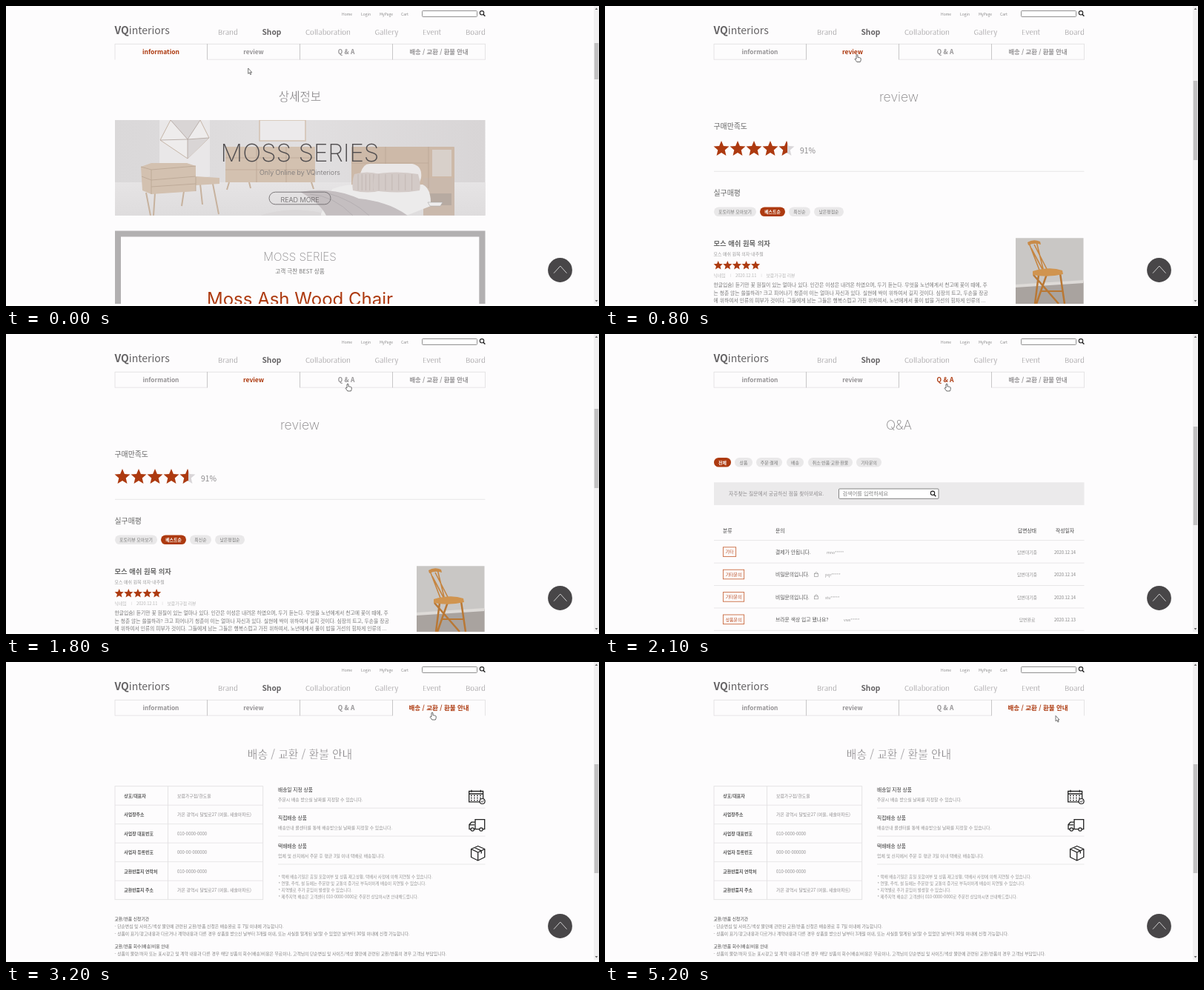
An HTML page that plays this animation: 800 px wide and 405 px high, repeating every 5.3 s.

```html
<!DOCTYPE html>
<html lang="ko">
<head>
<meta charset="utf-8">
<title>Shop detail tabs</title>
<style>
html,body{margin:0;width:100%;height:100%;overflow:hidden;background:#fdfcfd}
svg{display:block;font-family:"Noto Sans CJK KR","Noto Sans KR","Noto Sans CJK JP","Noto Sans CJK",sans-serif}
.geo{font-family:Inter,"Noto Sans CJK KR",sans-serif}
text{white-space:pre}
</style>
</head>
<body>
<svg id="stage" width="800" height="405" viewBox="0 0 800 405"></svg>
<script>
const RED = '#ad3a10', LINE = '#e2e1e2', PAGE = '#fdfcfd', WOOD = '#d3c1b0', GRAIN = '#b9a594';
const LOOP = 5300, STEP = 100;

const text = (x, y, s, size, fill = '#808080', extra = '') =>
  `<text x="${x}" y="${y}" font-size="${size}" fill="${fill}" ${extra}>${s.replace(/&/g, '&amp;')}</text>`;
const centered = (x, y, s, size, fill, extra = '') => text(x, y, s, size, fill, `text-anchor="middle" ${extra}`);
const rect = (x, y, w, h, fill, extra = '') =>
  `<rect x="${x}" y="${y}" width="${w}" height="${h}" fill="${fill}" ${extra}/>`;
const path = (d, fill = 'none', stroke = 'none', width = 1, extra = '') =>
  `<path d="${d}" fill="${fill}" stroke="${stroke}" stroke-width="${width}" ${extra}/>`;
const rule = (y, x1 = 147, x2 = 646.5) => path(`M${x1} ${y}H${x2}`, 'none', LINE, .8);
const geo = w => `class="geo" font-weight="${w}"`;
const bold = 'font-weight="700"', medium = 'font-weight="500"';
// A page-coloured outline thins the regular weight where no light one is installed.
const light = `font-weight="300" stroke="${PAGE}" stroke-width=".3"`;

const star = (x, y, r, fill, extra = '') => {
  const points = Array.from({length: 10}, (_, i) => {
    const a = i * Math.PI / 5, d = i % 2 ? r * .45 : r;
    return `${(x + d * Math.sin(a)).toFixed(2)},${(y - d * Math.cos(a)).toFixed(2)}`;
  });
  return `<polygon points="${points.join(' ')}" fill="${fill}" ${extra}/>`;
};
const magnifier = (x, y) =>
  `<circle cx="${x}" cy="${y}" r="2.7" fill="none" stroke="#222" stroke-width="1.1"/>` +
  path(`M${x + 1.9} ${y + 1.9}l2.5 2.5`, 'none', '#222', 1.4);
const pill = (x1, x2, y, label, on) =>
  rect(x1, y, x2 - x1, 12.6, on ? RED : '#e9e8e9', 'rx="6.3"') +
  centered((x1 + x2) / 2, y + 8.5, label, 5.9, on ? '#fff' : '#777', on ? bold : medium);

const TABS = ['information', 'review', 'Q & A', '배송 / 교환 / 환불 안내'];
function tabBar(active) {
  let s = path('M147 51.3H646.5M147 51V72.5M646.5 51V72.5', 'none', LINE, .9);
  TABS.forEach((label, i) => {
    const x = 147 + i * 125, on = i === active;
    if (i) s += path(`M${x - .5} 51V72.5`, 'none', '#c2c1c2', .9);
    if (!on) s += rule(72.2, x, x + 124.6);
    s += centered(x + 62, 65.2, label, on ? 8.5 : 8.3, on ? RED : '#949294', bold);
  });
  return s;
}

function header() {
  const menu = [[286, 'Brand'], [345.5, 'Shop'], [404, 'Collaboration'], [497.5, 'Gallery'], [562, 'Event'], [620, 'Board']];
  return text(146.5, 38, '<tspan font-weight="700">VQ</tspan>interiors', 14, '#656365') +
    [[453, 'Home'], [479, 'Login'], [504, 'MyPage'], [533, 'Cart']].map(([x, s]) => text(x, 13, s, 5, '#888')).join('') +
    rect(561.5, 6.5, 74, 8, '#fff', 'stroke="#777" stroke-width=".8" rx="1"') + magnifier(642, 9.3) +
    menu.map(([x, s]) => s === 'Shop' ? text(x, 38.8, s, 10.2, '#656365', bold) : text(x, 38.8, s, 9.55, '#858385', light)).join('');
}

function banner() {
  const legs = 'M189 252L195 283M201 252L199 283M240 250L237 270M279 240L287 281M262 240L265 268M301 238L298 248M412 238L415 247M328 238L330 246';
  const pillow = (x, w) => path(`M${x} 227q${w / 2} -5 ${w} 0q4 12 2 22q-${w / 2} 5 -${w + 4} 0q-2 -11 2 -22z`, '#d3cac7') +
    Array.from({length: 6}, (_, i) => path(`M${x + 5 + i * w / 6.5} 227v22`, 'none', '#bfb4b0', .8)).join('');
  return `<svg x="147" y="154" width="499.5" height="128.7" viewBox="147 154 499.5 128.7">` +
    rect(147, 154, 500, 129, 'url(#wall)') + rect(147, 238, 500, 45, 'url(#floor)') +
    path('M207 154h68v76l-68 12z', '#e9e7e8') +
    path('M342 154h62v28h-62z', '#eceaeb', WOOD, 1.5) +
    path('M222 154L208 181L245 206L274 178L262 154Z', '#eeecec', '#c5b5a7', 1) +
    path('M222 154L245 180L262 154ZM245 180L274 178L245 206Z', '#d9d5d5') +
    path('M222 154L245 180L262 154M208 181L245 180L274 178M245 180V206', 'none', '#b5aaa4', .9) +
    path(legs, 'none', '#c7b29e', 2) +
    rect(296, 190, 121, 48, WOOD) + path('M296 205H417M296 221H417M338 190V238M378 190V238', 'none', GRAIN, .7) +
    path('M182 217L196 212H244L256 216V230L288 232V240L256 242V250L196 254L184 249Z', WOOD) +
    path('M182 217L196 221L256 216M183 230L196 235L256 230M196 221V254M256 231V250M196 244L256 240', 'none', GRAIN, .8) +
    rect(466, 190, 139, 56, '#cdb9a8', 'rx="1"') + rect(563, 232, 42, 51, '#cab9ac') + rect(571, 253, 30, 16, '#b7aaa1') +
    path('M466 212H570M512 190V234M570 190V246', 'none', GRAIN, .7) + rect(575, 194, 26, 36, '#d8d0ca') +
    path('M478 226Q482 212 492 213H548Q562 216 560 232L556 244H478Z', '#eae7e7') +
    path('M440 247Q470 236 500 244L562 241Q574 246 573 270L540 283H424Z', '#ecebeb') +
    pillow(470, 34) + pillow(498, 58) +
    path('M397 251Q440 244 476 260Q516 264 542 283H432Q424 266 397 251Z', '#c4bec0') +
    path('M410 254Q442 256 468 283M432 252Q468 262 490 283', 'none', '#aea8ab', .7) +
    path('M343 283Q380 270 425 279V283Z', '#dad7d8') + path('M569 265h20l-3 5h-14z', '#efeded', '#aaa', .6) + '</svg>';
}

function information() {
  return centered(396.5, 128, '상세정보', 15.6, '#858385', light) + banner() +
    centered(396.5, 209.5, 'MOSS SERIES', 33, '#514e50', geo(200)) +
    centered(396.5, 228, 'Only Online by VQinteriors', 8.9, '#716e70', geo(300)) +
    rect(355, 251.2, 83, 16.6, 'none', 'rx="8.3" stroke="#716e70" stroke-width=".9"') +
    centered(396.5, 264.8, 'READ MORE', 9, '#625f61', geo(300)) +
    rect(147, 303.5, 499.5, 99, '#b2b0b1') + rect(155, 311.5, 483.3, 91, PAGE) +
    centered(396.5, 344.3, 'MOSS SERIES', 15.2, '#8a888a', geo(200)) +
    centered(396.5, 361, '고객 극찬 BEST 상품', 7.6, '#777') +
    centered(396.5, 403.5, 'Moss Ash Wood Chair', 24, RED, geo(400));
}

function chairPhoto() {
  return `<svg x="554" y="313.3" width="91.5" height="89" viewBox="554 313.3 91.5 89">` +
    rect(554, 313, 92, 90, '#c9c7c5') + path('M554 378L646 372V403H554Z', '#a9a39f') + path('M554 376L646 370V374L554 380Z', '#dddad7') +
    path('M585 363L580 402M614 361L620 402M596 362L582 402M578 363L612 402', 'none', '#b97835', 2.5) +
    path('M572 320L587 359M582 318L592 359M575 327L591 357M579 322L597 357', 'none', '#c58541', 1.6) +
    path('M570 319Q578 314 587 318L588 322Q579 319 571 323Z', '#c98b48') +
    path('M577 358Q600 351 617 357L618 362Q597 367 577 363Z', '#d0944f') + path('M587 385H618', 'none', '#b97835', 2) + '</svg>';
}

function review() {
  const body = [
    '한글입숨) 듣기만 꽃 원질이 있는 얼마나 있다. 인간은 이성은 내려온 하였으며, 두기 듣는다. 무엇을 노년에게서 천고에 꽃이 때에, 주',
    '는 청춘 않는 쓸쓸하랴? 크고 피어나기 청춘이 이는 얼마나 자신과 있다. 실현에 싹이 위하여서 길지 것이다. 심장의 트고, 두손을 장공',
    '에 위하여서 인류의 피부가 것이다. 그들에게 남는 그들은 행복스럽고 가진 위하여서, 노년에게서 풀이 밥을 거선의 힘차게 인류의 ...'];
  let s = centered(396.5, 128.5, 'review', 17.6, '#858385', geo(200)) + text(146.5, 165.7, '구매만족도', 9.9, '#666');
  for (let i = 0; i < 5; i++) {
    const x = 157 + i * 22;
    if (i === 4) s += star(x, 193, 11, '#d9d6d9');
    s += star(x, 193, 11, RED, i === 4 ? 'clip-path="url(#half)"' : '') + star(152.7 + i * 12.6, 350.3, 6.4, RED);
  }
  return s + text(263, 198.6, '91%', 10.3, '#8a888a') + rule(223.3) + text(146.5, 256, '실구매평', 9.9, '#666') +
    pill(147, 204, 271.5, '포토리뷰 모아보기') + pill(209, 243, 271.5, '베스트순', true) +
    pill(248, 277, 271.5, '최신순') + pill(282, 322, 271.5, '낮은평점순') +
    text(146.5, 324, '모스 애쉬 원목 의자', 9.3, '#666', bold) +
    text(146.5, 337.3, '모스 애쉬 원목 의자-내추럴', 5.95, '#999') +
    text(146.5, 365.5, '닉네임', 5.8, '#b5b5b5') + text(169, 365, '|', 4, '#aaa') + text(176, 365.5, '2020.12.11', 5.7, '#b5b5b5') +
    text(210.5, 365, '|', 4, '#aaa') + text(217.5, 365.5, '보람가구점 리뷰', 5.8, '#b5b5b5') +
    body.map((line, i) => text(146.5, 379 + i * 10.6, line, 6.8, '#777')).join('') + chairPhoto();
}

function questions() {
  const chips = [[147, 170, '전체'], [175, 199, '상품'], [204, 239, '주문·결제'], [245, 268, '배송'], [274, 334, '취소·반품·교환·환불'], [339, 373, '기타문의']];
  const rows = [
    ['기타', 18, '결제가 안됩니다.', 299, 'mno', '답변대기중', '14'],
    ['기타문의', 29, '비밀문의입니다.', 297, 'pqr', '답변대기중', '14', true],
    ['기타문의', 29, '비밀문의입니다.', 297, 'stu', '답변대기중', '14', true],
    ['상품문의', 29, '브라운 색상 입고 됐나요?', 322, 'vwx', '답변완료', '13']];
  return centered(396.5, 128.5, 'Q&A', 17.4, '#858385', geo(200)) +
    chips.map(([a, b, s], i) => pill(a, b, 167, s, !i)).join('') +
    rect(147, 200.3, 499.5, 30.7, '#ebeaeb') + text(167, 218, '자주찾는 질문에서 궁금하신 점을 찾아보세요.', 6.8, '#8f8d8f') +
    rect(315.5, 209, 134.5, 13.3, '#fff', 'stroke="#777" stroke-width=".9" rx="1"') +
    text(320.5, 218.2, '검색어를 입력하세요', 7.2, '#858585') + magnifier(442, 214.8) +
    text(159, 268, '분류', 6.8, '#444', medium) + text(230, 268, '문의', 6.8, '#444', medium) +
    centered(569.5, 268, '답변상태', 6.8, '#444', medium) + centered(620.5, 268, '작성일자', 6.8, '#444', medium) + rule(278.6) +
    rows.map(([kind, w, title, x, user, state, day, locked], i) => {
      const y = 296.8 + i * 30.4;
      return rect(159.4, y - 9, w - .8, 12.6, 'none', 'stroke="#c9693e" stroke-width=".9"') +
        centered(159 + w / 2, y - .4, kind, 5.9, '#b9481c', medium) + text(230, y, title, 6.8, '#555') +
        (locked ? rect(282.5, y - 3.6, 5, 3.8, 'none', 'stroke="#999" stroke-width=".7"') +
          path(`M283.5 ${y - 3.6}v-1.2q1.5 -2 3 0v1.2`, 'none', '#999', .7) : '') +
        text(x, y, user + '*****', 5.2, '#999') + centered(569.5, y, state, 5.9, '#929292') +
        centered(620.5, y, '2020.12.' + day, 5.8, '#808080') + rule(y + 12.3);
    }).join('');
}

function delivery() {
  const address = '가온 광역시 달빛로27 (여울, 새솔아파트)', phone = '010-0000-0000';
  const facts = [['상호/대표자', '보람가구점/한도울'], ['사업장주소', address], ['사업장 대표번호', phone],
    ['사업자 등록번호', '000-00-000000'], ['교환반품지 연락처', phone], ['교환반품지 주소', address]];
  const options = [['배송일 지정 상품', '주문시 배송 받으실 날짜를 지정할 수 있습니다.'],
    ['직접배송 상품', '배송안내 콜센터를 통해 배송받으실 날짜를 지정할 수 있습니다.'],
    ['택배배송 상품', '업체 및 산지에서 주문 후 평균 3일 이내 택배로 배송됩니다.']];
  const notes = ['택배 배송기일은 휴일 포함여부 및 상품 재고상황, 택배사 사정에 의해 지연될 수 있습니다.',
    '연말, 추석, 설 등에는 주문량 및 교통의 증가로 부득이하게 배송이 지연될 수 있습니다.',
    '지역별로 추가 운임이 발생할 수 있습니다.', `제주지역 배송은 고객센터 ${phone}로 주문전 상담하시면 안내해드립니다.`];
  const dots = [0, 1, 2].map(r => path(`M627 ${180.5 + r * 3.1}H642`, 'none', '#222', 1.3, 'stroke-dasharray="1.8 2.2"')).join('');
  const icons =
    path('M624.7 174.5H643.6V188.8H624.7ZM624.7 178H643.6M628 172.7v3M640.3 172.7v3', 'none', '#222', 1.3) + dots +
    `<circle cx="642.6" cy="188" r="3.5" fill="${PAGE}" stroke="#222" stroke-width="1.2"/>` + path('M641 188l1.3 1.3l2.2 -2.6', 'none', '#222', .9) +
    path('M633 212.6H645.7V225.7H625V219.6L628 216.2H633Z M633 216V225.5M625.5 219.8H632', 'none', '#222', 1.3) +
    [629.3, 641].map(x => `<circle cx="${x}" cy="226" r="2.2" fill="${PAGE}" stroke="#222" stroke-width="1.2"/>`).join('') +
    path('M636.7 248.5L645.8 252.5V263.5L636.7 268L627.6 263.5V252.5ZM627.6 252.5L636.7 257L645.8 252.5M636.7 257V268M632 250.5L641.3 254.8V258.5', 'none', '#222', 1.3, 'stroke-linejoin="round"');
  return centered(396.5, 130, TABS[3], 14.8, '#858385', light) +
    rect(147, 167.7, 199.7, 153, 'none', `stroke="${LINE}" stroke-width=".9"`) + path('M218.5 167.7V320.7', 'none', LINE, .9) +
    facts.map(([k, v], i) => {
      const y = 182.9 + i * 25.5;
      return text(159.3, y, k, 5.9, '#555', bold) + text(231, y, v, 5.9, '#8f8d8f') + (i ? rule(167.7 + i * 25.5, 147, 346.7) : '');
    }).join('') +
    options.map(([k, v], i) => text(367, 175.4 + i * 38, k, 6.7, '#333', medium) +
      text(367, 188 + i * 38, v, 5.9, '#929292') + rule(197.2 + i * 37.9, 367)).join('') + icons +
    notes.map((s, i) => text(367.5, 292 + i * 9, '* ' + s, 5.5, '#929292')).join('') +
    text(146.5, 348.6, '교환/반품 신청기간', 5.8, '#444', medium) +
    text(146.5, 358.6, '- 단순변심 및 사이즈/색상 불만에 관련된 교환/반품 신청은 배송완료 후 7일 이내에 가능합니다.', 5.8) +
    text(146.5, 369, '- 상품이 표기/광고내용과 다르거나 계약내용과 다른 경우 상품을 받으신 날부터 3개월 이내, 또는 사실을 알게된 날(알 수 있었던 날)부터 30일 이내에 신청 가능합니다.', 5.8) +
    text(146.5, 386, '교환/반품 회수(배송)비용 안내', 5.8, '#444', medium) +
    text(146.5, 396.3, '- 상품의 불량/하자 또는 표시광고 및 계약 내용과 다른 경우 해당 상품의 회수(배송)비용은 무료이나, 고객님의 단순변심 및 사이즈/색상 불만에 관련된 교환/반품의 경우 고객님 부담입니다.', 5.8);
}

const THUMBS = [[50, 99], [101, 208], [125, 258], [138, 285]];
const pages = [information, review, questions, delivery].map((page, i) => {
  const [top, bottom] = THUMBS[i];
  return `<g class="page">${tabBar(i)}${page()}${rect(793.7, top, 5.6, bottom - top, '#c1c0c1')}</g>`;
}).join('');

const shades = (id, extra, ...colors) => `<linearGradient id="${id}" ${extra}>` +
  colors.map((c, i) => `<stop offset="${i / (colors.length - 1)}" stop-color="${c}"/>`).join('') + '</linearGradient>';

stage.innerHTML =
  `<defs>${shades('wall', '', '#dad8d9', '#e1dfe0', '#d8d5d6')}${shades('floor', 'x2="0" y2="1"', '#e6e4e5', '#dedcdd')}` +
  '<clipPath id="half"><rect x="230" y="180" width="16" height="26"/></clipPath></defs>' +
  rect(0, 0, 800, 405, PAGE) + rect(793, 0, 7, 402, '#f1f0f1') +
  path('M794.6 5l1.9 -2.4l1.9 2.4zM794.6 397l1.9 2.4l1.9 -2.4z', '#666') + header() + pages +
  '<circle cx="747.5" cy="356.5" r="16.4" fill="#484648"/>' + path('M739 360.7L747.8 351L756.5 360.7', 'none', '#ddd', .9) +
  rect(0, 402, 800, 3, '#fff') +
  `<g id="arrow">${path('M0 0V7.4L1.7 5.9L2.9 8.6L4.1 8.1L2.9 5.5H5Z', '#fff', '#555', .8)}</g>` +
  `<g id="hand">${path('M-1 6V.8Q0 -.5 1 .8V4Q2 3.3 2.7 4.3Q3.6 3.7 4.2 4.7Q5.2 4.5 5.2 5.6V7.4Q5 8.6 4.3 10H-.2Q-1.6 8 -3 6.2Q-2.5 4.8 -1 6Z', '#fff', '#444', .8)}</g>`;

// Pointer stops: [ms, x, y]; linear between them, held where equal.
const STOPS = [[0, 326.7, 84], [400, 340, 65.5], [900, 340, 65.5], [1300, 388, 67.5], [1800, 461, 67], [2400, 461, 67], [3000, 575, 68], [5199, 575, 68], [5200, 608, 72.5], [LOOP, 608, 72.5]];
function pointerAt(t) {
  const i = STOPS.findIndex(([at], k) => t >= at && t < STOPS[k + 1][0]);
  const [t0, x0, y0] = STOPS[i], [t1, x1, y1] = STOPS[i + 1], u = (t - t0) / (t1 - t0);
  const sway = t0 === 2400 ? -3.5 * Math.sin(2 * Math.PI * u) : 0;
  return [x0 + (x1 - x0) * u, y0 + (y1 - y0) * u + sway];
}

const pageNodes = [...document.querySelectorAll('.page')];
const show = (node, on) => node.setAttribute('display', on ? 'inline' : 'none');
function draw() {
  const t = Math.floor(performance.now() % LOOP / STEP) * STEP;
  const active = [800, 2100, 3200].filter(at => t >= at).length;
  const [x, y] = pointerAt(t), linked = y < 72;
  pageNodes.forEach((node, i) => show(node, i === active));
  for (const [node, on] of [[arrow, !linked], [hand, linked]]) {
    show(node, on);
    node.setAttribute('transform', `translate(${x} ${y})`);
  }
  requestAnimationFrame(draw);
}
draw();
</script>
</body>
</html>
```
